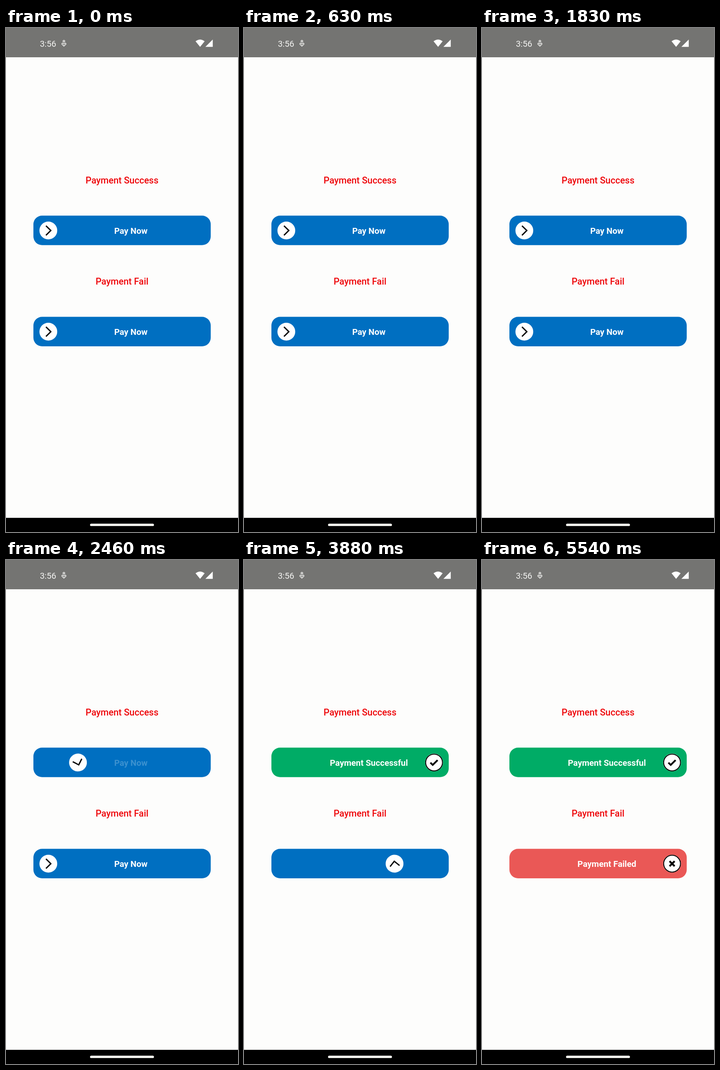
Write an HTML page that moves like this. It is 508 px wide and 1102 px high and loops after 5.58 s.

```html
<!DOCTYPE html>
<html lang="en">
<head>
<meta charset="utf-8">
<title>Slide to pay</title>
<style>
  html, body { margin: 0; width: 100%; height: 100%; overflow: hidden; background: #fdfdfc; }
  svg { display: block; width: 508px; height: 1102px; }
  text { font-family: Roboto, sans-serif; text-anchor: middle; }
  .heading { font-size: 20px; font-weight: 500; fill: #ee0307; }
  .label { font-size: 18.6px; font-weight: 700; fill: #fff; }
  .icon { fill: none; stroke: #000; }
</style>
</head>
<body>
<svg viewBox="0 0 508 1102">
  <rect width="508" height="1102" fill="#fdfdfc"/>
  <rect width="508" height="64" fill="#747472"/>
  <text x="92" y="40.6" font-size="18.5" fill="#f4f4f2">3:56</text>
  <g fill="none" stroke="#f4f4f2" stroke-width="1.5">
    <circle cx="126.8" cy="28.8" r="1.9"/>
    <path d="M126.8 39.6L122.2 35.2Q122.4 32.6 124.6 33.2L126.8 35.2L129 33.2Q131.2 32.6 131.4 35.2Z"/>
  </g>
  <path d="M415 29Q425 21.4 435 29L425 41.3ZM436.6 41.3H452.7V25.2Z" fill="#fff"/>
  <text class="heading" x="254" y="340">Payment Success</text>
  <text class="heading" x="254" y="561">Payment Fail</text>
  <g id="bars"></g>
  <rect y="1071" width="508" height="31" fill="#000"/>
  <rect x="184" y="1083.7" width="140" height="5.4" rx="2.7" fill="#f3f3ee"/>
</svg>
<script>
const LOOP = 5580, FRAME = 1000 / 24;
const SLIDE = 1013, TRAVEL = 323.5, SWITCH_AT = 0.84;
const BLUE = '#006fc1';

const sliders = [
  { top: 410.3, start: 2255, done: 'Payment Successful', color: '#00ac66',
    mark: 'M-8 .3L-3 5.3L7.7 -5.2', weight: 3.8 },
  { top: 631.5, start: 3133, done: 'Payment Failed', color: '#ea5856',
    mark: 'M-5.5 -5.5L5.5 5.5M5.5 -5.5L-5.5 5.5', weight: 4 }
];

function add(parent, tag, attrs, text = '') {
  const el = document.createElementNS('http://www.w3.org/2000/svg', tag);
  for (const key in attrs) el.setAttribute(key, attrs[key]);
  el.textContent = text;
  return parent.appendChild(el);
}

for (const s of sliders) {
  const group = add(document.getElementById('bars'), 'g', { transform: `translate(60 ${s.top})` });
  const label = { class: 'label', x: 213.4, y: 39.6 };
  s.bar = add(group, 'rect', { width: 388.3, height: 64.5, rx: 19 });
  s.payText = add(group, 'text', label, 'Pay Now');
  s.doneText = add(group, 'text', label, s.done);
  s.thumb = add(group, 'g', {});
  add(s.thumb, 'circle', { r: 19.5, fill: '#fff' });
  s.chevron = add(s.thumb, 'path', { class: 'icon', d: 'M-5.2 -10.4L5.4 0L-5.2 10.4', 'stroke-width': 2.8 });
  s.result = add(s.thumb, 'g', { class: 'icon' });
  add(s.result, 'circle', { r: 18.4, 'stroke-width': 2 });
  add(s.result, 'path', { d: s.mark, 'stroke-width': s.weight });
}

const clamp = v => Math.min(1, Math.max(0, v));

function pose(s, time) {
  const p = clamp((time - s.start) / SLIDE);
  const finished = p >= SWITCH_AT;
  s.bar.setAttribute('fill', finished ? s.color : BLUE);
  s.payText.setAttribute('opacity', clamp(1 - p * 3.8));
  s.doneText.setAttribute('opacity', +finished);
  s.chevron.setAttribute('opacity', +!finished);
  s.result.setAttribute('opacity', +finished);
  s.thumb.setAttribute('transform', `translate(${32.7 + p * TRAVEL} 32.5) rotate(${p * 360})`);
}

// The motion advances in 24 fps steps.
function draw(now) {
  const time = Math.floor((now % LOOP + 5) / FRAME) * FRAME;
  for (const s of sliders) pose(s, time);
}

const began = performance.now();
function tick() {
  draw(performance.now() - began);
  requestAnimationFrame(tick);
}
tick();
</script>
</body>
</html>
```
